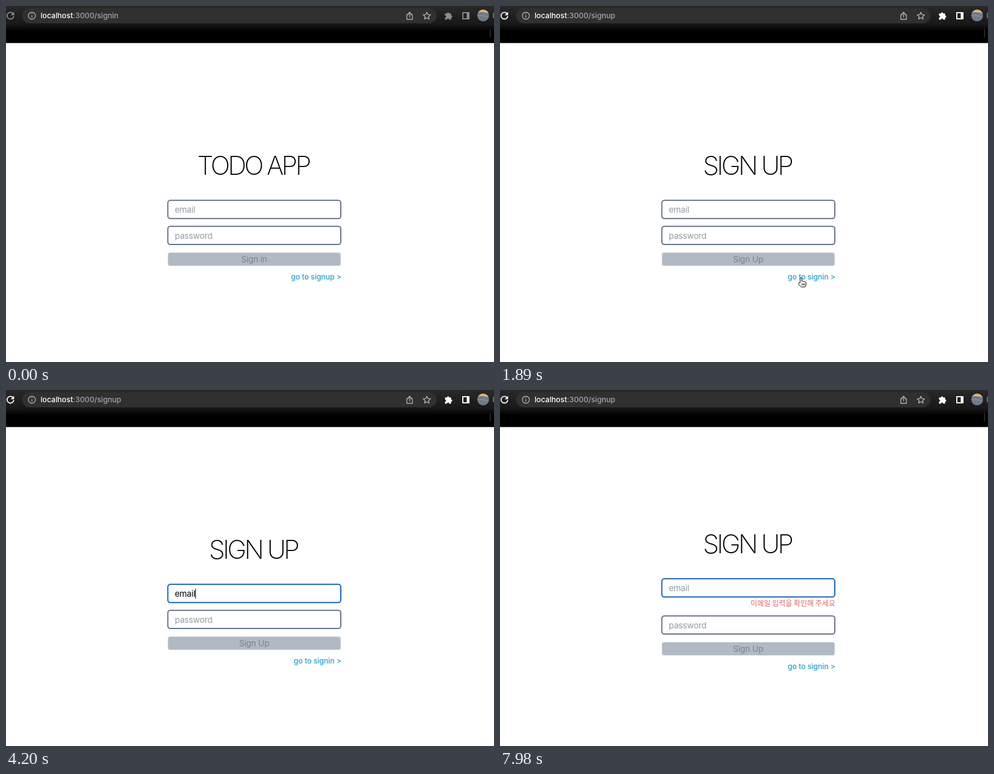
An HTML page for the animation above (8 s loop, 876 by 639 pixels).

```html
<!DOCTYPE html>
<html lang="en">
<head>
<meta charset="utf-8">
<title>Sign up form</title>
<style>
  html, body { margin: 0; width: 100%; height: 100%; overflow: hidden; background: #fff; }
  svg { display: block; font-family: Inter, sans-serif; }
  .line { fill: none; stroke: currentColor; stroke-width: 1.4; stroke-linecap: round; stroke-linejoin: round; }
  .url { font-size: 13.4px; font-weight: 500; fill: #a2a6ab; }
  .title { font-size: 46.5px; font-weight: 200; letter-spacing: -3.9px; text-anchor: middle; }
  .field { fill: #fff; stroke: #5f6b80; stroke-width: 2; }
  .label { font-size: 15.1px; letter-spacing: -.25px; }
  .hint { fill: #959aa3; }
  .link { font-size: 13.4px; font-weight: 500; letter-spacing: -.1px; fill: #2b9fcd; text-anchor: end; }
  .error { font: 13px "Noto Sans CJK KR", "Noto Sans CJK JP", "Noto Sans CJK", sans-serif; fill: #df6464; text-anchor: end; }
  .pointer { stroke-width: 1; stroke-linejoin: round; }
</style>
</head>
<body>
<svg width="876" height="639" viewBox="0 0 876 639">
  <defs>
    <linearGradient id="bar" x2="0" y2="1">
      <stop stop-color="#292929"/><stop offset=".48" stop-color="#191919"/>
      <stop offset=".68" stop-color="#000"/>
    </linearGradient>
    <clipPath id="round"><circle cx="856.5" cy="17" r="10.5"/></clipPath>
  </defs>

  <rect width="876" height="66.5" fill="url(#bar)"/>
  <rect x="29" y="4" width="744" height="27" rx="13.5" fill="#303030"/>
  <path d="M869.5 41V56" stroke="#484848"/>

  <g color="#b4b7bb">
    <circle class="line" cx="46.5" cy="17.5" r="6.3"/>
    <path class="line" d="M46.5 17V20.5M46.5 14.3V14.4"/>
    <path class="line" d="M722 15.5H719.5V24H729.5V15.5H727M724.5 20V11.5M721.7 14L724.5 11.2L727.3 14"/>
    <path class="line" d="M755.5 11.2L757.4 15.4L762 15.9L758.6 19L759.5 23.5L755.5 21.2L751.5 23.5L752.4 19L749 15.9L753.6 15.4Z"/>
  </g>
  <g id="icons">
    <path class="line" style="stroke-width:1.9" d="M12.5 13.5A6 6 0 1 0 13.8 18.7"/>
    <path d="M14.5 10.5V16.5H8.5Z" fill="currentColor"/>
    <path d="M788 13.5H791.5A2.1 2.1 0 1 1 795.7 13.5H799V17A2 2 0 1 1 799 21V24.5H795.5A2 2 0 0 0 791.5 24.5H788V21A2 2 0 0 0 788 17Z" fill="currentColor"/>
    <path fill-rule="evenodd" d="M819 11H832V24H819ZM821 13V22H827V13Z" fill="currentColor"/>
  </g>
  <g clip-path="url(#round)">
    <rect x="845" y="6" width="23" height="23" fill="#6d7b89"/>
    <path d="M845 6H868V14Q857 9 845 12Z" fill="#e3b277"/>
    <path d="M845 16Q857 15 868 20V22Q856 17 845 18Z" fill="#7f8b96"/>
  </g>
  <circle cx="885" cy="17" r="10.5" fill="none" stroke="#a9c98b"/>

  <text class="url" x="62" y="22"><tspan fill="#fff">localhost</tspan>:3000/<tspan id="route"></tspan></text>

  <g id="upper">
    <text id="title" class="title" x="443.8" y="303"></text>
    <rect id="email" class="field" x="290.5" y="348.8" width="310.5" height="32.7" rx="4.5"/>
    <text id="value" class="label" x="303" y="371"></text>
    <rect id="caret" y="356.5" width="1.2" height="18"/>
    <text id="error" class="error" x="602" y="397">이메일 입력을 확인해 주세요</text>
  </g>
  <g id="lower">
    <rect class="field" x="290.5" y="395.4" width="310.5" height="32.7" rx="4.5"/>
    <text class="label hint" x="303" y="417.5">password</text>
    <rect x="290.5" y="442.5" width="310.5" height="24" rx="4" fill="#b1b9c5" stroke="#e8ebef"/>
    <text id="button" class="label" x="445.5" y="460" fill="#7e838b" text-anchor="middle"></text>
    <text id="link" class="link" x="602" y="490.5"></text>
  </g>

  <g id="cursor">
    <g id="ring" fill="none">
      <circle r="16.5" fill="#fff" fill-opacity=".6"/>
      <circle r="14.5" stroke="#000" stroke-width="3"/>
    </g>
    <path id="arrow" class="pointer" d="M0 0V15L3.4 11.8L5.8 17L8.1 16L5.8 10.9H10.5Z" stroke="#fff"/>
    <path id="hand" class="pointer" stroke="#000" fill="#fff" d="M-1.7 9V1A1.5 1.5 0 0 1 1.3 1V6Q2.8 4.8 4 6.4Q5.6 5.4 6.6 7.1Q8.8 6.6 8.8 9V12Q8.4 14 7.2 16.3H0L-4.6 10.8Q-5 8.6 -3 8.6ZM1.7 10V13.5M4 10V13.5M6.2 10V13.5"/>
    <path id="beam" class="line" style="stroke-width:1.2" d="M-3 -7Q0 -7 0 -5Q0 -7 3 -7M0 -5V5M-3 7Q0 7 0 5Q0 7 3 7M-1.5 1.5H1.5"/>
  </g>
</svg>
<script>
const LOOP = 8000, STEP = 70;
const ui = Object.fromEntries([...document.querySelectorAll('svg [id]')].map(el => [el.id, el]));
const within = (t, spans) => spans.some(([from, to]) => t >= from && t < to);
const show = (el, on) => el.setAttribute('visibility', on ? 'visible' : 'hidden');
const shift = (el, x, y) => el.setAttribute('transform', `translate(${x} ${y})`);

const clicks = [[910, 1120], [1610, 1820], [2590, 2800]];
const caretOn = [[2660, 3220], [3430, 4480], [5040, 5530], [6090, 6580], [7140, 7980]];
const typed = [3430, 3570, 3640, 3780, 3920];
const erased = [7560, 7630, 7700, 7770, 7840];
const moves = [
  { start: 350, end: 770, from: [452, 608], to: [540.5, 488] },
  { start: 2240, end: 2590, from: [540.5, 488], to: [477, 367] },
];

function pointerAt(t) {
  const { start, end, from, to } = moves[t < 2240 ? 0 : 1];
  const p = Math.min(1, Math.max(0, (t - start) / (end - start)));
  const eased = p * p * (3 - 2 * p);
  return from.map((v, i) => v + (to[i] - v) * eased);
}

function pointerKind(t, [x, y]) {
  const inside = (left, top, bottom) => x > left && x < 602 && y > top && y < bottom;
  if (t < 980) return 'arrow';
  if (inside(290, 348, 383) || inside(290, 394, 429)) return 'beam';
  return inside(512, 478, 494) ? 'hand' : 'arrow';
}

function render(t) {
  const signup = t >= 1750, invalid = t >= 4410;
  ui.icons.setAttribute('color', t >= 980 ? '#fff' : '#8b8d90');
  ui.route.textContent = signup ? 'signup' : 'signin';
  ui.title.textContent = signup ? 'SIGN UP' : 'TODO APP';
  ui.button.textContent = signup ? 'Sign Up' : 'Sign in';
  ui.link.textContent = `go to ${signup ? 'signin' : 'signup'} >`;

  shift(ui.upper, 0, invalid ? -10 : 0);
  shift(ui.lower, 0, invalid ? 10 : 0);
  show(ui.error, invalid);
  ui.email.style.stroke = t >= 2660 ? '#0b59b5' : '';

  const past = times => times.filter(time => t >= time).length;
  const length = past(typed) - past(erased);
  ui.value.textContent = 'email'.slice(0, length || 5);
  ui.value.classList.toggle('hint', !length);
  ui.caret.setAttribute('x', 303 + (length ? ui.value.getComputedTextLength() : 0));
  show(ui.caret, within(t, caretOn));

  const point = pointerAt(t), kind = pointerKind(t, point), visible = t >= 350 && t < 3430;
  shift(ui.cursor, ...point);
  for (const name of ['arrow', 'hand', 'beam']) show(ui[name], visible && name === kind);
  show(ui.ring, within(t, clicks));
}

function tick() {
  const t = performance.now() % LOOP;
  render(Math.floor(t / STEP) * STEP);
  requestAnimationFrame(tick);
}
tick();
</script>
</body>
</html>
```
